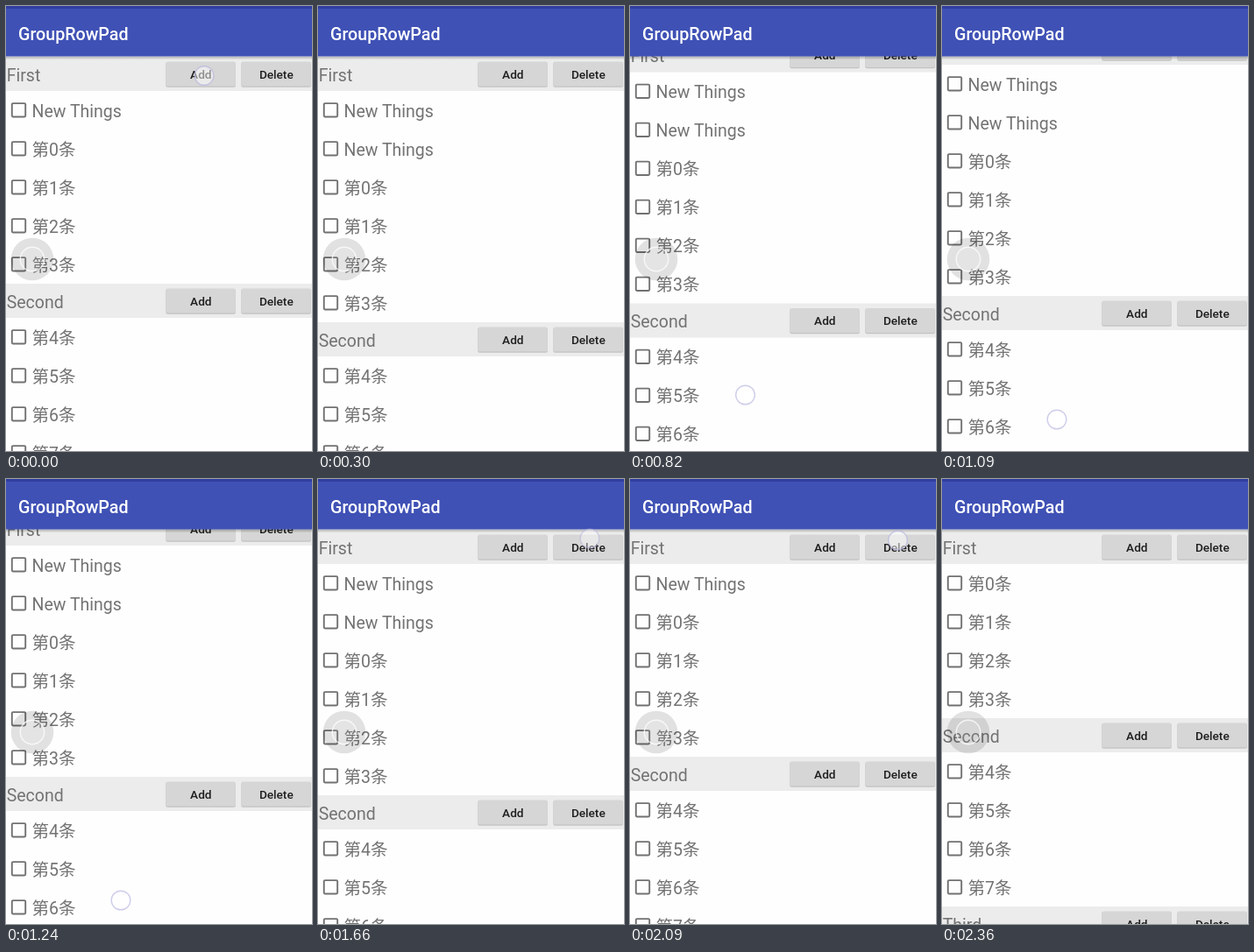
Recreate the animation shown at these times as an HTML page. Size 349 px wide and 508 px high, loop 3.48 s.

```html
<!DOCTYPE html>
<html lang="en">
<head>
<meta charset="utf-8">
<title>Grouped list</title>
<style>
  html, body { margin: 0; width: 100%; height: 100%; overflow: hidden; background: #fefefe; }
  svg { display: block; width: 349px; height: 508px; }
  text { font: 19.5px Roboto, "Noto Sans CJK SC", "Noto Sans CJK", sans-serif; fill: #737373; }
  .title { font-size: 19.7px; font-weight: 500; fill: #fff; }
  .label { font-size: 13.6px; font-weight: 500; fill: #1e1e1e; text-anchor: middle; }
  .box { fill: none; stroke: #717171; stroke-width: 1.9; }
</style>
</head>
<body>
<svg viewBox="0 0 349 508">
  <defs>
    <linearGradient id="shade" x1="0" y1="0" x2="0" y2="1">
      <stop offset="0" stop-color="#000" stop-opacity=".25"/>
      <stop offset="1" stop-color="#000" stop-opacity="0"/>
    </linearGradient>
  </defs>
  <rect width="349" height="508" fill="#fefefe"/>
  <g id="list"></g>
  <rect y="57.5" width="349" height="4" fill="url(#shade)"/>
  <rect width="349" height="57.5" fill="#3f51b5"/>
  <rect width="349" height="3" fill="#303f9f"/>
  <text class="title" x="14" y="38.7">GroupRowPad</text>
  <circle cx="30" cy="289" r="24.3" fill="#000" fill-opacity=".115"/>
  <circle cx="30" cy="289" r="13.7" fill="#fff" fill-opacity=".12" stroke="#fff" stroke-opacity=".75" stroke-width="1.4"/>
  <circle id="touch" r="10.8" fill="#fff" fill-opacity=".5" stroke="#b4b4de" stroke-opacity=".65" stroke-width="1.4"/>
</svg>
<script>
const LOOP = 3480, TOP = 58, HEAD = 39, ROW = 44, HEIGHT = 508;
const list = document.getElementById("list");
const touch = document.getElementById("touch");

function button(x, y, label) {
  return `<rect x="${x}" y="${y + 6.6}" width="79.6" height="28.2" rx="2" fill="#000" fill-opacity=".18"/>
    <rect x="${x}" y="${y + 5.6}" width="79.6" height="28" rx="2" fill="#d6d6d6"/>
    <text class="label" x="${x + 40}" y="${y + 24.7}">${label}</text>`;
}

function header(y, name) {
  return `<rect y="${y}" width="349" height="${HEAD}" fill="#ececec"/>
    <text x="0.7" y="${y + 27.5}">${name}</text>` +
    button(182.3, y, "Add") + button(268.3, y, "Delete");
}

function row(y, name) {
  return `<rect class="box" x="6.8" y="${y + 14.1}" width="15.4" height="15.4" rx="1.2"/>
    <text x="29.6" y="${y + 29.7}">${name}</text>`;
}

function drawList(added, scroll) {
  let y = TOP - scroll, html = "";
  const put = (draw, size, name) => {
    if (y < HEIGHT) html += draw(y, name);
    y += size;
  };
  ["First", "Second", "Third"].forEach((name, group) => {
    put(header, HEAD, name);
    if (group === 0) for (let i = 0; i < added; i++) put(row, ROW, "New Things");
    for (let i = 0; i < 4; i++) put(row, ROW, `第${group * 4 + i}条`);
  });
  list.innerHTML = html;
}

const between = (t, from, to) => t >= from && t < to;
const hops = (t, from, hold) => Math.floor((t - from) / hold);

function addedRows(t) {
  if (between(t, 150, 1780)) return 2;
  return t < 2240 ? 1 : 0;
}

// The finger moves in held hops; a tap leaves a faint trace after release.
function finger(t) {
  if (t < 300) return { x: 226, y: 79.5, alpha: t < 150 ? 1 : 0.25 };
  if (between(t, 700, 1090)) return { x: 131.5, y: 455 - 11 * Math.min(2, hops(t, 700, 120)), alpha: 1 };
  if (between(t, 1090, 1390)) return { x: 131, y: 472 + 9 * hops(t, 1090, 150), alpha: 1 };
  if (between(t, 1510, 1780)) {
    const n = hops(t, 1510, 150);
    return { x: 312.5 - 2.5 * n, y: 66 + 2 * n, alpha: 0.8 };
  }
  if (between(t, 2090, 2360)) return { x: 305.5, y: 70, alpha: t < 2240 ? 1 : 0.25 };
  return { x: 0, y: 0, alpha: 0 };
}

// The list follows the finger, then rests where the drag left it.
function scrollAt(t) {
  if (between(t, 700, 1090)) return 465.5 - finger(t).y;
  if (between(t, 1090, 1390)) return 502 - finger(t).y;
  return between(t, 1390, 1660) ? 21 : 0;
}

let shown = "";
function render(t) {
  const added = addedRows(t), scroll = scrollAt(t), { x, y, alpha } = finger(t);
  touch.setAttribute("cx", x);
  touch.setAttribute("cy", y);
  touch.setAttribute("opacity", alpha);
  const state = `${added} ${scroll}`;
  if (state === shown) return;
  shown = state;
  drawList(added, scroll);
}

const start = performance.now();
function tick() {
  render((performance.now() - start) % LOOP);
  requestAnimationFrame(tick);
}
tick();
</script>
</body>
</html>
```
